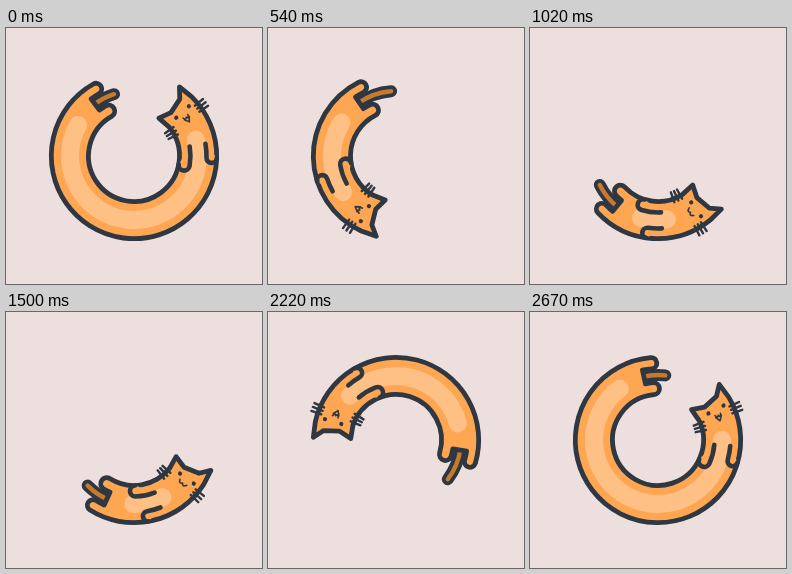
These frames come from a looping animation (256x256 px, 2.7 s). An HTML page:

```html
<!DOCTYPE html>
<html lang="en">
<head>
<meta charset="utf-8">
<title>Cat loader</title>
<style>
html, body { margin: 0; width: 100%; height: 100%; overflow: hidden; background: #ecdfde; }
svg { display: block; width: 100vw; height: 100vh; }
path { fill: none; stroke: #2f3742; stroke-linecap: round; stroke-linejoin: round; }
#tailEdge { stroke-width: 12; }
#tail { stroke: #c87a2b; stroke-width: 4.4; }
#body { fill: #ffa652; stroke: none; }
#belly { stroke: #ffc086; stroke-width: 18; }
#edge { stroke-width: 4.8; }
#arms { fill: #ffa652; stroke-width: 4.6; }
#whiskers { stroke-width: 2.4; }
#mouth { stroke-width: 1.6; }
#eyes { stroke-width: 4.2; }
</style>
</head>
<body>
<svg viewBox="0 0 256 256">
  <path id="tailEdge"/><path id="tail"/>
  <path id="body"/><path id="belly"/><path id="edge"/>
  <path id="arms"/><path id="whiskers"/><path id="mouth"/><path id="eyes"/>
</svg>
<script>
const LOOP = 2700, STEP = 30, W = 2 * Math.PI / LOOP;
const OUT = 82.7, IN = 45.5;
const PEAK = 2620; // moment of the longest body

// Two turns per loop, with a slow rest at the bottom
function headAngle(t) {
  const a = W * (t + 185);
  return 371.5 + 720 * t / LOOP + 104 * Math.sin(a) + 2.7 * Math.cos(2 * a);
}

// Rounded spike around PEAK, slightly slower to grow than to shrink
function bodyLength(t) {
  const half = LOOP / 2;
  const x = (t - PEAK + half + LOOP) % LOOP - half;
  const near = Math.max(0, 1 - Math.hypot(x, 60) / half);
  return 100 + 248 * near ** 2.7 - 4 * Math.sin(W * x);
}

const tailReach = t => 14 - 6 * Math.cos(2 * W * (t - 2680));

// Polar point around the ring centre, degrees counter-clockwise
function pt(r, deg) {
  const a = deg * Math.PI / 180;
  return (128 + r * Math.cos(a)).toFixed(2) + ' ' + (128 - r * Math.sin(a)).toFixed(2);
}
const move = (r, a) => 'M' + pt(r, a);
const line = (r, a) => 'L' + pt(r, a);
const curve = (r, a, r2, a2) => 'Q' + pt(r, a) + ' ' + pt(r2, a2);
const arc = (r, a, b) => `A${r} ${r} 0 ${+(Math.abs(b - a) > 180)} ${+(b < a)} ${pt(r, b)}`;
const cap = (r0, r1, a) => {
  const r = Math.abs(r1 - r0) / 2;
  return `A${r} ${r} 0 0 ${+(r1 < r0)} ${pt(r1, a)}`;
};
const set = (id, d) => document.getElementById(id).setAttribute('d', d);

function draw(t) {
  const head = headAngle(t), len = bodyLength(t);
  const hind = head - len, leg = hind + 3.5, crotch = hind + 11;

  const tail = move(65, crotch + 1) + arc(65, crotch + 1, hind - tailReach(t));
  set('tailEdge', tail);
  set('tail', tail);

  const body = move(OUT, head - 11) + arc(OUT, head - 11, leg) + cap(OUT, 71.5, leg) +
    arc(71.5, leg, crotch) + line(57.5, crotch) + arc(57.5, crotch, leg) + cap(57.5, IN, leg) +
    arc(IN, leg, head - 17) + line(45.3, head) + line(57, head - 7) +
    line(73, head - 5.5) + line(82.7, head) + 'Z';
  set('body', body);
  set('edge', body);

  const from = hind + 35, to = head - 42;
  set('belly', move(64, from) + arc(64, from, to));

  const wrist = head - 47, paw = head - 67, paw2 = head - 58;
  set('arms', move(56.5, wrist) + arc(56.5, wrist, paw) + cap(56.5, IN, paw) +
    move(72.5, wrist) + arc(72.5, wrist, paw2) + cap(72.5, OUT, paw2));

  let hairs = '';
  for (const k of [-1, 0, 1]) {
    const a = head - 25.5 + 5 * k, b = head - 19.8 + 2.7 * k;
    hairs += move(38.5, a) + line(49, a) + move(79, b) + line(89.5, b);
  }
  set('whiskers', hairs);

  const eye = head - 14.5;
  set('eyes', move(57, eye) + line(57, eye + .02) + move(74, eye) + line(74, eye + .02));

  // A flat smile that opens into a small triangle on the longer body
  const m = head - 20, open = Math.max(0, Math.min(1, (len - 105) / 35));
  const w = 4.5 - 1.5 * open;
  set('mouth', move(65 - w, m + 1) + curve(65 - w / 2, m - 3, 65, m) +
    curve(65 + w / 2, m - 3, 65 + w, m + 1) +
    (open ? move(65 - w, m - 1) + line(65, m - 1 - 4 * open) + line(65 + w, m - 1) : ''));
}

const start = performance.now();
function tick() {
  const t = (performance.now() - start) % LOOP;
  draw(Math.floor(t / STEP) * STEP);
  requestAnimationFrame(tick);
}
tick();
</script>
</body>
</html>
```
